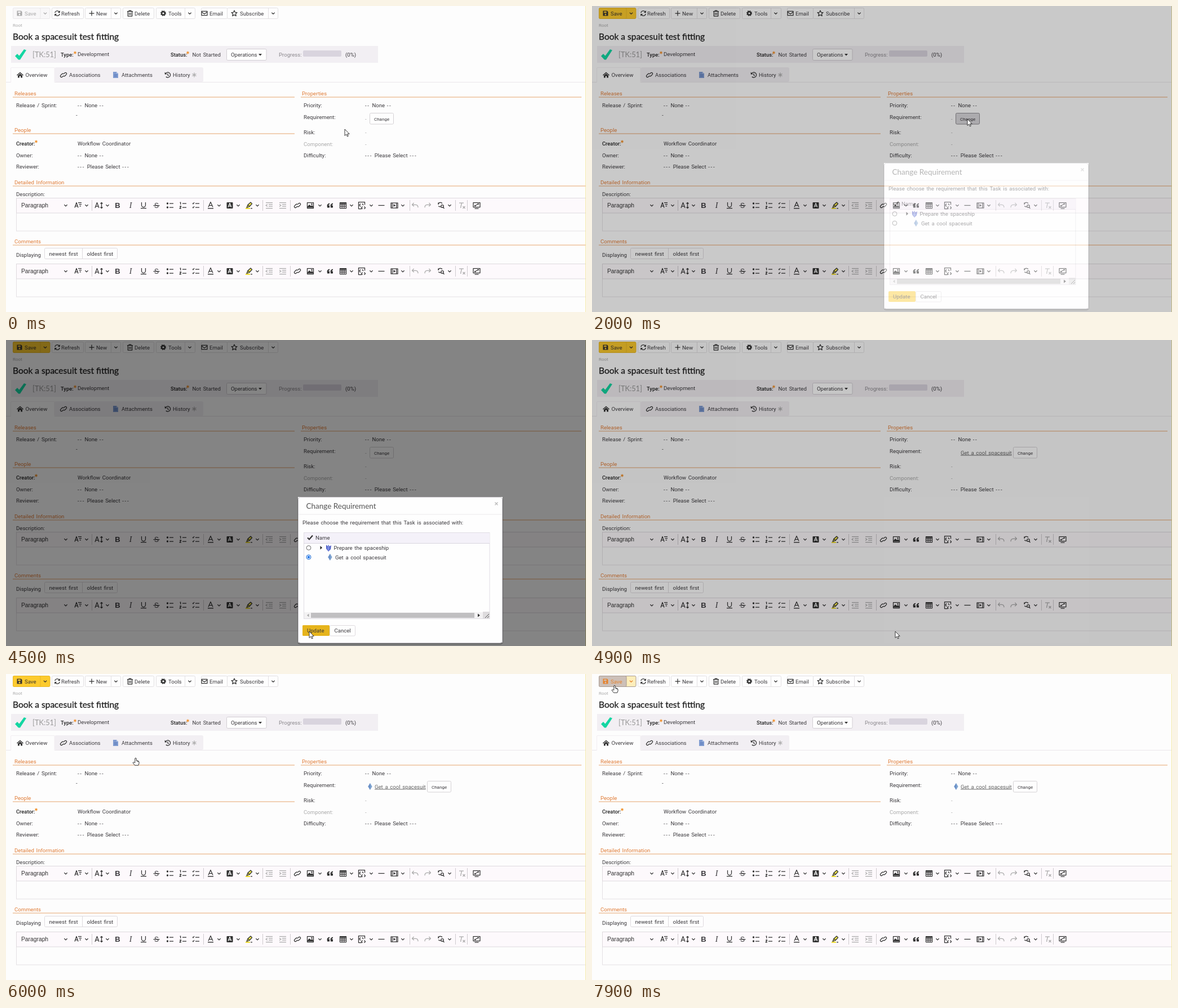
Recreate the animation shown at these times as an HTML page. Size 1029 by 544 pixels, loop 8000 ms.

```html
<!DOCTYPE html>
<html lang="en">
<head>
<meta charset="utf-8">
<title>Task details</title>
<style>
html, body { margin: 0; width: 100%; height: 100%; overflow: hidden; background: #fdfdfd; }
svg { display: block; width: 100vw; height: 100vh; }
text { font: 9.6px Roboto, sans-serif; fill: #3b393d; word-spacing: 1.3px; white-space: pre; }
.b { font-weight: 500; font-size: 9.4px; fill: #222; }
.s { font-size: 8px; }
.h { fill: #e07b35; }
.dim { fill: #aaa; }
.title { font: 15.5px Lato, sans-serif; fill: #222; stroke: #222; stroke-width: .3px; word-spacing: 0; }
.sub { font: 13.5px Lato, sans-serif; fill: #555; word-spacing: 0; }
.key { font: 12.8px Lato, sans-serif; fill: #999; }
.para { font: 10.3px "Liberation Sans", Arial, sans-serif; fill: #333; }
.glyph { font: bold 13px "Liberation Sans", Arial, sans-serif; text-anchor: middle; }
.i { fill: none; stroke: #333; stroke-width: 1.25; stroke-linejoin: round; }
.i .f { fill: #333; stroke: none; }
.grey { stroke: #aaa; }
.grey .f { fill: #aaa; }
</style>
</head>
<body>
<svg id="stage" viewBox="0 0 1029 544" preserveAspectRatio="none"></svg>
<script>
const LOOP = 8000, STEP = 100;

// Drawing helpers; text is placed by its vertical centre.
const text = (x, y, s, cls = '', attr = '') =>
  `<text x="${x}" y="${y + 3.5}" class="${cls}" ${attr}>${s.replace(/-{2,}/g, '<tspan letter-spacing="1.7">$&</tspan>')}</text>`;
const rect = (x, y, w, h, fill, stroke = 'none', r = 0) =>
  `<rect x="${x}" y="${y}" width="${w}" height="${h}" rx="${r}" fill="${fill}" stroke="${stroke}"/>`;
const line = (x1, y1, x2, y2, color) => `<path d="M${x1} ${y1}L${x2} ${y2}" stroke="${color}"/>`;
const path = (d, fill, attr = '') => `<path d="${d}" fill="${fill}" ${attr}/>`;
const group = (id, body, attr = '') => `<g id="${id}" ${attr}>${body}</g>`;

const solid = d => `<path class="f" d="${d}"/>`;
const open = d => `<path d="${d}"/>`;
const dot = (x, y, r) => `<circle class="f" cx="${x}" cy="${y}" r="${r}"/>`;
const glyph = (s, style = '') => `<text class="glyph" y="4.6" stroke="none" style="${style}">${s}</text>`;
const rows = 'M-1-3.5H6M-1 3.5H6';
const dents = 'M-6-5H6M-1-1.7H6M-1 1.7H6M-6 5H6';
const letterA = 'M-4 3L0-6L4 3M-2.8 0H2.8';
const chain = 'M-1 2.3L-2.4 3.7A2 2 0 0 1-5.2 .9L-2.6-1.8A2 2 0 0 1 .6-1.4M1-2.3L2.4-3.7A2 2 0 0 1 5.2-.9L2.6 1.8A2 2 0 0 1-.6 1.4';

const icons = {
  chev: open('M-2.6-1.2L0 1.4L2.6-1.2'),
  size: open('M-6 4L-3-5L0 4M-5 1H-1M0-5H6M1.5-2H6M2.5 1H5'),
  height: open('M-7 4.5L-3.5-5L0 4.5M-6 1.5H-1M4.5-5V5M2.5-3L4.5-5L6.5-3M2.5 3L4.5 5L6.5 3'),
  bold: glyph('B'),
  italic: glyph('I', 'font:italic 14px Liberation Serif,serif'),
  under: open('M-3.5-5.5V-.5A3.5 3.5 0 0 0 3.5-.5V-5.5M-5 5H5'),
  strike: glyph('S', 'font-weight:400;font-size:12px') + open('M-5.5 .3H5.5'),
  bullets: open(rows) + dot(-4.5, -3.5, 1.7) + dot(-4.5, 3.5, 1.7),
  numbers: open(rows + 'M-5.5-5L-4.3-5.5V-1.5M-6 2.2Q-3-.2-3.6 2.6L-6 5.4H-3'),
  todo: open(rows + 'M-6-4L-5-2.5L-3-5.3M-6 3L-5 4.5L-3 1.7'),
  color: open(letterA) + solid('M-5 4.6H5V6H-5Z'),
  back: solid('M-4.5-5.5H4.5Q5.5-5.5 5.5-4.5V4.5Q5.5 5.5 4.5 5.5H-4.5Q-5.5 5.5-5.5 4.5V-4.5Q-5.5-5.5-4.5-5.5Z') + '<path d="M-2.7 3L0-4L2.7 3M-2 1H2" stroke="#fff"/>',
  marker: '<path d="M-4 4L-2-1L3-5.5L5.5-3L1 2Z" fill="#f7e84a"/>' + open('M-2-1L1 2') + '<path d="M-6 5.3H2" stroke="#e9d400" stroke-width="1.7"/>' + open('M3 5.3H6'),
  outdent: open(dents + 'M-3-2L-6 0L-3 2'),
  indent: open(dents + 'M-6-2L-3 0L-6 2'),
  link: open(chain),
  image: open('M-5.5-5H5.5V5H-5.5Z') + solid('M-5 4V2L-2-1.5L1 1L3-.5L5 2V4Z') + dot(2.5, -2.2, 1.2),
  quote: solid('M-5 4Q-7-3-1-4V-2Q-3-1.5-3 0H-1V4ZM1 4Q-1-3 5-4V-2Q3-1.5 3 0H5V4Z'),
  table: open('M-5.5-5H5.5V5H-5.5ZM-5.5-1.7H5.5M-5.5 1.7H5.5M-1.8-5V5M1.8-5V5') + solid('M-5.5-5H5.5V-3H-5.5Z'),
  html: open('M0 6H-5.5V-6H5.5V-1M-2-3L-4 -.5L-2 2M1-3L3-.5M1.5 2L-.5 4.2L1.5 6.2M4.5 2L6.5 4.2L4.5 6.2'),
  rule: open('M-5.5 0H5.5'),
  media: open('M-6-4.5H6V4.5H-6ZM-3.8-4.5V4.5M3.8-4.5V4.5') + solid('M-1.6-2.5L2.3 0L-1.6 2.5Z'),
  undo: open('M-2.5-4.5L-5.5-1.2L-2.2 1.8M-5-1.2H1Q5-1 5 3.8'),
  redo: open('M2.5-4.5L5.5-1.2L2.2 1.8M5-1.2H-1Q-5-1-5 3.8'),
  find: open('M-5-1.5A3.8 3.8 0 0 1 2-3.4M-5-1.5V-5M-4.6 1A3.8 3.8 0 0 0 0 2M5.5 5.5L3 3') + '<circle cx="2" cy="1.4" r="2.3"/>',
  clear: open('M-5-4.5H3M-.5-4.5L-2.5 4.5M1.5 1.5L5.5 5.5M5.5 1.5L1.5 5.5'),
  full: open('M-6-5H6V3H-6ZM-3.5 5.5H3.5M-3.5-.2V1H-1.5M3.5-1.8V-3H1.5M-3 .5L3-2.5'),
  disk: solid('M-4.5-4.5H2.7L4.5-2.7V4.5H-4.5ZM-2.8-3.2V-.8H1.8V-3.2ZM0 .6A1.5 1.5 0 0 0 0 3.6A1.5 1.5 0 0 0 0 .6Z').replace('class', 'fill-rule="evenodd" class'),
  refresh: open('M-4.2-.8A4.2 4.2 0 0 1 3.3-2.7M4.2 .8A4.2 4.2 0 0 1-3.3 2.7') + solid('M4.8-5V-1H.8ZM-4.8 5V1H-.8Z'),
  plus: open('M-4.5 0H4.5M0-4.5V4.5'),
  trash: open('M-5-3.3H5M-1.8-3.5V-5H1.8V-3.5M-3.7-3V5H3.7V-3M-1.3-1V3M1.3-1V3'),
  gear: '<circle r="2.8" stroke-width="2.4"/><circle r="4.3" stroke-width="1.5" stroke-dasharray="1.7 1.68"/>',
  mail: open('M-5-3.7H5V3.7H-5ZM-5-2.5L0 1.2L5-2.5'),
  star: open('M0-5L1.5-1.7L5-1.4L2.4 1L3.2 4.6L0 2.7L-3.2 4.6L-2.4 1L-5-1.4L-1.5-1.7Z'),
  home: solid('M-6 .2L0-5L6 .2L5 1.2L0-3.2L-5 1.2ZM-4 1.2L0-2.3L4 1.2V5H1.2V2H-1.2V5H-4Z'),
  clock: open('M-4-2.2A4.6 4.6 0 1 1-3.2 3.3M0-2.5V.5L2 1.7') + solid('M-5.3-5V-1H-1.3Z'),
  aster: open('M0-4V4M-3.5-2L3.5 2M-3.5 2L3.5-2')
};
const icon = (name, x, y, cls = '') => `<g class="i ${cls}" transform="translate(${x} ${y})">${icons[name]}</g>`;

const required = (x, y) => `<g transform="translate(${x} ${y}) scale(.62)" fill="none" stroke="#f0902a" stroke-width="1.8">${icons.aster}</g>`;
const heading = (x, y, s, x1, x2) => text(x, y, s, 'h') + line(x1, y + 7, x2, y + 7, '#e6a46c');
const diamond = (x, y) => path(`M${x} ${y - 6}L${x + 3.6} ${y}L${x} ${y + 6}L${x - 3.6} ${y}Z`, '#7ea3d0') +
  path(`M${x} ${y - 6}V${y + 6}L${x - 3.6} ${y}Z`, '#6a90c8');

const button = (x, w, name, ix, tx, label, drop) =>
  rect(x + .5, 3.5, w, 19, '#fefefe', '#e2e0e2', 2) + icon(name, ix, 13) + text(tx, 13, label) +
  (drop ? line(drop + .5, 3.5, drop + .5, 22.5, '#e2e0e2') + icon('chev', drop + 9, 13) : '');

function saveButton(id, bg, dropBg, edge, ink) {
  const body = rect(12.5, 3.5, 65.5, 19, dropBg, edge, 2) + rect(12.5, 3.5, 48.5, 19, bg, edge, 2) +
    icon('disk', 24, 13) + text(33, 13, 'Save') + icon('chev', 69.5, 13);
  return `<style>#${id} text, #${id} .f { fill: ${ink} } #${id} .i { stroke: ${ink} }</style>` + group(id, body);
}

function editor(y) {
  const c = y + 13.5;
  const tools = { size: 128, height: 165, bold: 198, italic: 221, under: 244, strike: 267, bullets: 291, numbers: 314,
    todo: 337, color: 363, back: 397, marker: 431, link: 517, image: 540, quote: 575, table: 598, html: 631,
    rule: 666, media: 689, find: 772, full: 835 };
  const pale = { outdent: 467, indent: 491, undo: 726, redo: 748, clear: 809 };
  const drops = [106, 143, 180, 378, 412, 446, 557, 613, 648, 704, 787];
  const bars = [152.5, 350.5, 455.5, 504.5, 716.5, 797.5, 818.5];
  return rect(18.5, y + .5, 1020, 58.5, '#fdfdfd', '#e4e1e4') + rect(18.5, y + .5, 1020, 26.5, '#fdf9fc', '#dedade') +
    text(27, c, 'Paragraph', 'para') +
    Object.entries(tools).map(([n, x]) => icon(n, x, c)).join('') +
    Object.entries(pale).map(([n, x]) => icon(n, x, c, 'grey')).join('') +
    drops.map(x => icon('chev', x, c)).join('') +
    bars.map(x => line(x, y + 4, x, y + 23, '#cfcbcf')).join('');
}

const change = (x, bg, edge) => rect(x + .5, 190.5, 42, 19.5, bg, edge, 2) + text(x + 8, 200.5, 'Change', 's');

const page = [
  rect(0, 0, 1029, 544, '#fdfdfd'),
  saveButton('saveOff', '#f8f7f8', '#f8f7f8', '#eae8ea', '#aaa'),
  saveButton('saveOn', '#fdcb2e', '#fdcb2e', '#e8b828', '#3a3530'),
  saveButton('saveHover', '#fdeebb', '#fdeebb', '#eab04a', '#e6822c'),
  saveButton('saveDown', '#cdc0b8', '#fdeebb', '#a89a90', '#e6822c'),
  button(81, 56, 'refresh', 91, 98, 'Refresh'),
  button(140, 63, 'plus', 152, 160, 'New', 186),
  button(207, 55, 'trash', 220, 228, 'Delete'),
  button(266, 69, 'gear', 279, 288, 'Tools', 317),
  button(346, 46, 'mail', 352, 361, 'Email'),
  button(392, 90, 'star', 405, 415, 'Subscribe', 465),
  text(12, 33.5, 'Root', 's dim'),
  text(12, 56, 'Book a spacesuit test fitting', 'title'),

  rect(9, 71, 651, 30, '#f2eff3'),
  path('M16 89L20 85L23.5 88.5L32 77L36 78.5L25 95.5H22Z', '#14d6a2'),
  text(47, 87, '[TK:51]', 'key'),
  text(97, 86, 'Type:', 'b'), required(122.5, 83), text(127, 85.5, 'Development'),
  text(292, 86, 'Status:', 'b'), required(322.5, 83), text(330.5, 86, 'Not Started'),
  rect(391.5, 76.5, 70.5, 20, '#fefefe', '#d2ced4', 2), text(399, 86.5, 'Operations'),
  path('M448 85H454L451 88.5Z', '#333'),
  text(484, 86, 'Progress:', '', 'style="fill:#8b888d"'), rect(527, 79, 68, 11, '#d9d4de', 'none', 2), text(602, 86.5, '(0%)'),

  rect(86, 109, 264, 26, '#f2eff3', 'none', 3),
  line(0, 135.5, 1029, 135.5, '#eae7ea'), path('M8.5 136V111Q8.5 109.5 10 109.5H86V136', '#fdfdfd', 'stroke="#f2eff2"'),
  icon('home', 25, 122.5), text(34.5, 122.5, 'Overview'),
  icon('link', 102, 122.5), text(112, 122.5, 'Associations'),
  path('M190 117H196L199 120V128H190Z', '#7f9bd0'), path('M196 117V120H199Z', '#bccbe8'),
  path('M192 122.5H197M192 125H197', 'none', 'stroke="#5878b8"'), text(205, 122.5, 'Attachments'),
  icon('clock', 287, 122.5), text(296, 122.5, 'History'), icon('aster', 334, 122.5, 'grey'),

  heading(15, 155, 'Releases', 12, 512),
  text(18, 176.5, 'Release / Sprint:'), text(127, 176.5, '-- None --'), text(124, 193, '-'),
  heading(15, 220, 'People', 12, 512),
  text(18, 244.5, 'Creator:', 'b'), required(53.5, 241), text(127, 244.5, 'Workflow Coordinator'),
  text(18, 265, 'Owner:'), text(127, 265, '-- None --'),
  text(18, 285.5, 'Reviewer:'), text(127, 285.5, '--- Please Select ---'),
  heading(525, 155, 'Properties', 523, 1021),
  text(528, 176.5, 'Priority:'), text(637, 176.5, '-- None --'),
  text(528, 197, 'Requirement:'),
  text(528, 224.5, 'Risk:'), text(637, 224.5, '-', 'dim'),
  text(528, 245, 'Component:', 'dim'), text(637, 245, '-', 'dim'),
  text(528, 265.5, 'Difficulty:'), text(637, 265.5, '--- Please Select ---'),
  group('unset', text(637, 200.5, '-', 'dim') + change(645, '#fefefe', '#d4d1d4') +
    group('changeHover', change(645, '#e9e7ea', '#bdbabd')) + group('changeDown', change(645, '#d9d7db', '#908e93'))),
  group('linked', text(654, 200, 'Get a cool spacesuit', '', 'style="fill:#666;text-decoration:underline"') + change(747, '#fefefe', '#d4d1d4')),
  group('gem', diamond(646, 200)),

  heading(15, 313, 'Detailed Information', 12, 1029),
  text(18, 334, 'Description:'), editor(341),
  heading(15, 418, 'Comments', 12, 1029),
  text(18, 442.5, 'Displaying'),
  rect(68.5, 430.5, 129, 19, '#fefefe', '#dedade', 2), line(135.5, 430.5, 135.5, 449.5, '#dedade'),
  text(76.5, 440.5, 'newest first'), text(143.5, 440.5, 'oldest first'),
  editor(458),
  line(1028.5, 0, 1028.5, 544, '#f4e9a6')
].join('');

const radio = y => `<circle cx="537" cy="${y}" r="3.9" fill="#fff" stroke="#666"/>`;
const dialog = [
  rect(517, 279.5, 365, 262, '#0003', 'none', 5),
  rect(518.5, 279.5, 362, 259, '#fefefe', '#c9c6cc', 4),
  text(532.5, 296, 'Change Requirement', 'sub'),
  path('M867.5 288.5L872.5 293.5M872.5 288.5L867.5 293.5', 'none', 'stroke="#bbb" stroke-width="1.4"'),
  line(519, 310, 880, 310, '#ebe9ec'),
  text(526, 324, 'Please choose the requirement that this Task is associated with:'),
  rect(528.5, 342.5, 329.5, 153, '#fefefe', '#e0dde4'),
  rect(529, 343, 329, 18, '#f4f1f9'), line(528, 361.5, 858, 361.5, '#d9d5e0'),
  path('M535 351.5L538 354.5L544 347.5', 'none', 'stroke="#333" stroke-width="2.2"'), text(549, 351.5, 'Name'),
  radio(369.5), path('M557.5 366L561 369.3L557.5 372.6Z', '#222'),
  path('M568 364L571 367L572 364L574 367L577 365L576 372L572 376L568 371Z', '#4c5cc8'), path('M572 364L574.5 370L572 376L569.5 370Z', '#7a8ce0'),
  text(581.5, 369.5, 'Prepare the spaceship'),
  group('rowHover', rect(529, 378, 329, 17, '#f6f3fa')),
  radio(386), group('picked', '<circle cx="537" cy="386" r="3.9" fill="#fff" stroke="#1a73e8"/><circle cx="537" cy="386" r="2.2" fill="#1a73e8"/>'),
  diamond(575, 386), text(584, 386, 'Get a cool spacesuit'),
  rect(529, 484, 317, 11, '#f3f2f3'), rect(541, 485, 290, 9, '#c0bfc1'),
  path('M537.5 486.5V492.5L534 489.5Z', '#aaa'), path('M837 486.5V492.5L841 489.5Z', '#333'),
  rect(846, 483, 12, 12, '#dddbdd'), path('M850 494L857 487M854 494L857 491', 'none', 'stroke="#555"'),
  rect(526, 507, 48, 19, '#fdcb2e', 'none', 2), group('updateHover', rect(526, 507, 48, 19, '#e6b41c', 'none', 2)), text(534, 516.5, 'Update'),
  rect(574.5, 507.5, 45, 18.5, '#fefefe', '#dedade', 2), text(582.5, 516.5, 'Cancel')
].join('');

const pointer = 'stroke="#222" stroke-width=".9" stroke-linejoin="round"';
document.getElementById('stage').innerHTML = page +
  group('shade', path('M0 0H1029V544H0ZM518 279V538H881V279Z', '#000', 'fill-rule="evenodd"')) +
  group('shadeGap', rect(518, 279, 363, 259, '#000')) +
  group('dialog', dialog) +
  group('cursor',
    group('arrow', path('M0 0V11.5L2.7 9L4.5 13L6.3 12.2L4.6 8.4H8.2Z', '#fff', pointer)) +
    group('hand', path('M-1.2 1Q0-.8 1.2 1V5Q5 4.6 6 7V10L4.8 13.3H-1.5L-5 8.7Q-4.2 6.8-1.2 8.8ZM3 7V5.2M4.6 7.3V5.7', '#fff', pointer)));

// Tables hold [time, value]; glides advance once per STEP, holds jump.
function play(id, table, css, glide) {
  const frames = table.map(([t, v], i) => {
    const next = table[i + 1];
    const easing = glide && next ? `steps(${Math.round((next[0] - t) / STEP)})` : 'step-end';
    return { offset: t / LOOP, ...css(v), easing };
  });
  frames.push({ offset: 1, ...css(table.at(-1)[1]) });
  document.getElementById(id).animate(frames, { duration: LOOP, iterations: Infinity });
}
const alpha = v => ({ opacity: v });
const move = ([x, y]) => ({ transform: `translate(${x}px, ${y}px)` });
const show = (id, ...times) => {
  const table = times.map((t, i) => [t, 1 - i % 2]);
  play(id, times[0] ? [[0, 0], ...table] : table, alpha);
};

show('saveOff', 0, 1700);
show('saveOn', 1700, 7200);
show('saveHover', 7200, 7900);
show('saveDown', 7900);
show('unset', 0, 4900);
show('changeHover', 700, 1700);
show('changeDown', 1700, 2300);
show('linked', 4900);
show('gem', 5000);
show('rowHover', 2400, 4000);
show('picked', 3500);
show('updateHover', 4200, 4900);
show('arrow', 0, 5900, 6400, 7100);
show('hand', 5900, 6400, 7100);

const fade = [[4900, .22], [5300, 0]];
play('shade', [[0, 0], [1700, 0], [2400, .48], [4800, .48], ...fade], alpha, true);
play('shadeGap', [[0, 0], [4800, 0], ...fade], alpha, true);
play('dialog', [[0, 0], [1700, 0], [2400, 1], [4800, 1], [4900, 0]], alpha, true);
play('cursor', [[0, [601, 219]], [100, [601, 219]], [800, [666, 201]], [2100, [666, 201]], [2500, [562, 386]],
  [3100, [538, 383]], [3700, [538, 383]], [4500, [538, 518]], [5500, [538, 518]], [5700, [486, 455]],
  [6000, [230, 149]], [6600, [75, 70]], [7300, [40, 20]]], move, true);
</script>
</body>
</html>
```
